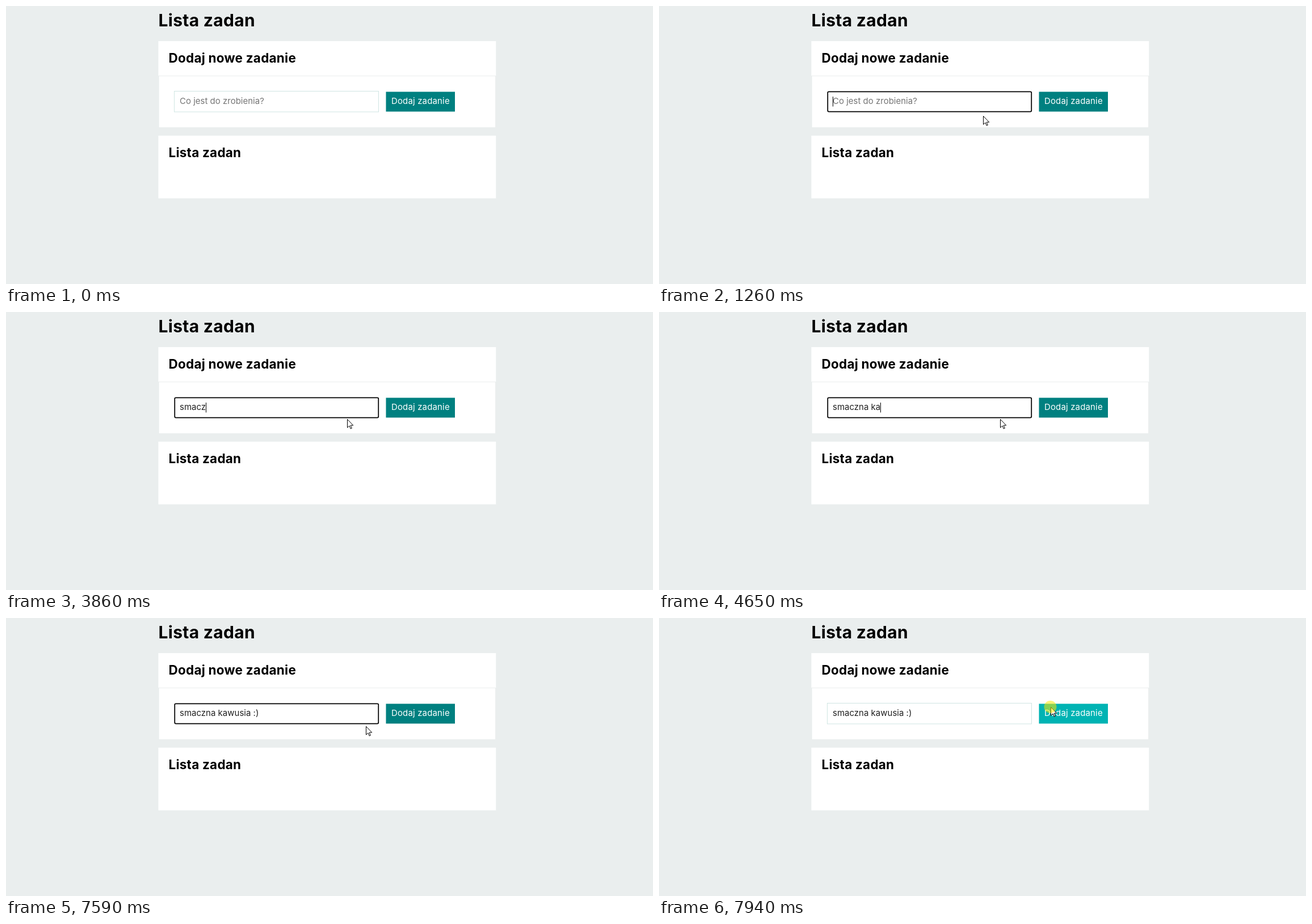
An HTML page for the animation above (8000 ms loop, 1140x491 px).

```html
<!DOCTYPE html>
<html lang="pl">
<head>
<meta charset="utf-8">
<title>Lista zadan</title>
<style>
  html, body { margin: 0; width: 100%; height: 100%; overflow: hidden; background: #eaeeee; }
  svg { display: block; width: 100vw; height: 100vh; }
  text { font: 400 15px Montserrat, Inter, sans-serif; white-space: pre; }
  .h1, .h2 { font-weight: 700; letter-spacing: .01em; }
  .h1 { font-size: 30px; }
  .h2 { font-size: 22.5px; }
  .label { letter-spacing: .01em; }
</style>
</head>
<body>
<svg viewBox="0 0 1140 491">
  <rect width="1140" height="491" fill="#eaeeee"/>
  <text class="h1" x="268.5" y="35.5">Lista zadan</text>

  <rect x="268.5" y="62" width="594.8" height="61" fill="#fff"/>
  <rect x="269.7" y="124" width="592.4" height="90.2" fill="#fff"/>
  <text class="h2" x="286.5" y="100">Dodaj nowe zadanie</text>

  <rect id="idle" x="296.5" y="150.5" width="360" height="36.5" fill="#fff" stroke="#cfe5e3"/>
  <rect id="focus" x="297.25" y="151.25" width="359" height="35.25" rx="2" fill="#fff" stroke="#000" stroke-width="1.75"/>
  <text id="hint" x="306" y="173" fill="#757575">Co jest do zrobienia?</text>
  <text id="typed" x="306" y="173" fill="#222"></text>
  <rect id="caret" x="306" y="160" width="1" height="17.5"/>

  <rect id="button" x="669.5" y="151.5" width="121.5" height="35"/>
  <text class="label" x="679" y="173" fill="#fff">Dodaj zadanie</text>

  <rect x="268.5" y="229" width="594.8" height="110.7" fill="#fff"/>
  <text class="h2" x="286.5" y="267">Lista zadan</text>

  <g id="mouse">
    <path id="arrow" d="M.5 .5V15.2L4 12L6.2 17.2L8.3 16.3L6.1 11.2H10.7Z" fill="#fff" stroke="#000"/>
    <path id="beam" d="M-3 -7.5H-1L0 -6.5L1 -7.5H3M0 -6.5V6.5M-3 7.5H-1L0 6.5L1 7.5H3" fill="none" stroke="#000"/>
    <circle id="click" cx="-.5" r="11" fill="#ffeb00" fill-opacity=".53"/>
  </g>
</svg>
<script>
const LOOP = 8000, FOCUS = 930, HOVER = 7800, BLUR = 7940;
const MESSAGE = 'smaczna kawusia :)';
const keys = [2990, 3070, 3190, 3720, 3860, 4060, 4190, 4390, 4590, 4650,
  5050, 5180, 5470, 5610, 5730, 6130, 6600, 6800];
const caretOff = [[1460, 2000], [2520, 2990], [7260, 7790]];
const clicks = [[930, 1000], [7940, 8000]];

// Pointer stops: time, x, y
const stops = [
  [1190, 557, 182], [1260, 571, 194], [1340, 592, 191], [1460, 601, 189],
  [7590, 634, 191], [7660, 645, 189], [7730, 660, 182],
  [7800, 674, 170], [7870, 686, 160], [7940, 690, 157]
];
// The pointer sweeps in from the left and slows down over the input
for (let i = 8; i >= 0; i--) {
  const ease = 1 - (1 - i / 8) ** 2;
  stops.unshift([140 + i * 65, 177 + 368 * ease, 290 - 118 * ease]);
}

const $ = id => document.getElementById(id);
const [idle, focusRing, hint, typed, caret, button, mouse, arrow, beam, click] =
  ['idle', 'focus', 'hint', 'typed', 'caret', 'button', 'mouse', 'arrow', 'beam', 'click'].map($);
const show = (el, on) => el.setAttribute('visibility', on ? 'visible' : 'hidden');
const within = (t, spans) => spans.some(([a, b]) => t >= a && t < b);

function draw(t) {
  const focused = t >= FOCUS && t < BLUR;
  const count = keys.filter(k => k <= t).length;
  show(idle, !focused);
  show(focusRing, focused);
  show(hint, !count);

  const text = MESSAGE.slice(0, count);
  if (typed.textContent !== text) typed.textContent = text;
  const width = count ? typed.getComputedTextLength() : 0;
  caret.setAttribute('x', Math.floor(306 + width));
  show(caret, focused && !within(t, caretOff));
  button.setAttribute('fill', t >= HOVER ? '#00b3b3' : '#008080');

  const stop = stops.filter(s => s[0] <= t).pop();
  const [, x, y] = stop || [0, 0, 0];
  const overInput = x > 296 && x < 657 && y > 150 && y < 188;
  mouse.setAttribute('transform', `translate(${Math.round(x)} ${Math.round(y)})`);
  show(arrow, stop && !overInput);
  show(beam, stop && overInput);
  show(click, within(t, clicks));
}

const start = performance.now();
function tick() {
  draw((performance.now() - start) % LOOP);
  requestAnimationFrame(tick);
}
tick();
</script>
</body>
</html>
```
